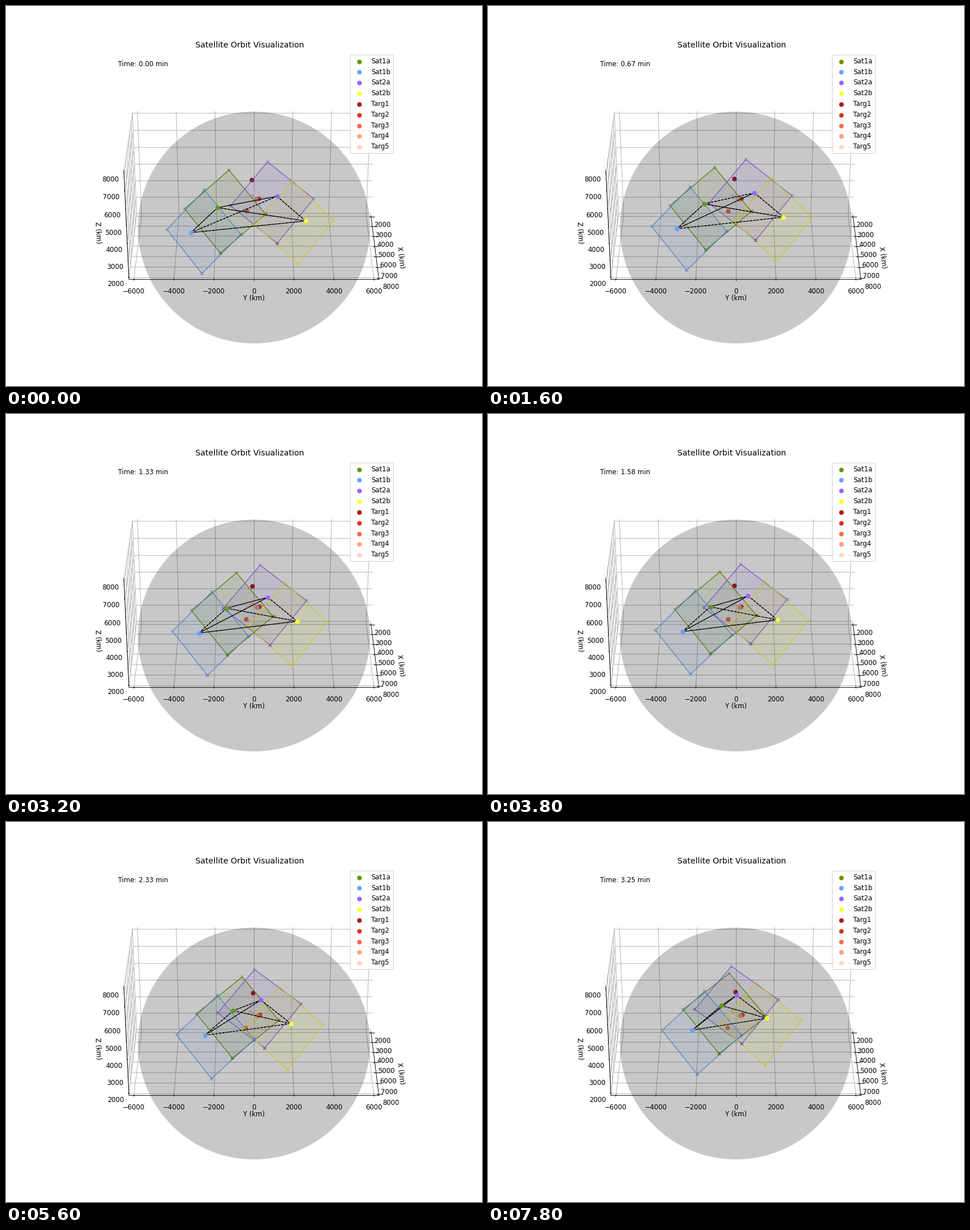
Write a matplotlib script that moves like this. It is 837 px wide and 669 px high and loops after 8000 ms.

```python
from itertools import combinations

import matplotlib.pyplot as plt
import numpy as np
from matplotlib.animation import FuncAnimation
from matplotlib.patches import Circle, Polygon

W, H, DPI = 837, 669, 83.7
FRAMES, STEP = 40, 200
CENTER, RADIUS = np.array([436, 390]), 204

# Each satellite: colour, start and end position, start and end footprint
# (corners ordered top, left, bottom, right), all in stage pixels.
SATS = {
    "Sat1a": ("#669900", (372, 355), (410.2, 323.2),
              [(392, 289), (314, 357), (377, 435), (456.5, 366.5)],
              [(424.5, 266.3), (343, 330), (406.3, 408), (489, 342.5)]),
    "Sat1b": ("#66a3ff", (325, 399), (359.3, 366.4),
              [(349, 324), (283, 393.5), (344.5, 471), (413, 402)],
              [(380.8, 297.7), (306, 367), (368, 444.3), (445.6, 375.3)]),
    "Sat2a": ("#9966ff", (476.5, 335), (437.3, 305),
              [(460, 274.3), (395, 351.5), (477, 418), (541, 339.5)],
              [(428, 254), (363.4, 329.9), (446.3, 390.3), (510.4, 313)]),
    "Sat2b": ("#ffff33", (527, 378.5), (490.2, 345.5),
              [(503.5, 307.5), (438, 384.5), (514, 454.5), (576, 377)],
              [(471.5, 282.8), (407.8, 358), (487, 428), (551, 350)]),
}
TARGETS = [
    ((432, 305.7), (435, 298.8)),
    ((444, 339), (447, 339)),
    ((423, 360), (420.5, 362.5)),
    ((440, 340.3), (443.2, 340.6)),
    ((432, 335.5), (429.3, 334.3)),
]


def mix(a, b, u):
    return np.array(a) * (1 - u) + np.array(b) * u


def corner_alpha(pts):
    """Fade corners that lie further round the globe."""
    r2 = ((pts - CENTER) ** 2).sum(axis=1)
    depth = -np.sqrt(np.maximum(RADIUS ** 2 - r2, 0))
    return 1 - 0.7 * (depth - depth.min()) / np.ptp(depth)


# The tiny excess keeps the pixel size from rounding down
fig = plt.figure(figsize=((W + 0.01) / DPI, (H + 0.01) / DPI), dpi=DPI)

ax = fig.add_subplot(projection="3d")
ax.set_xlim(1875, 8125)
ax.set_ylim(-6250, 6250)
ax.set_zlim(1875, 8125)
ax.set_box_aspect((1, 2, 1))
ax.view_init(30, 0)
ax.set_xlabel("X (km)")
ax.set_ylabel("Y (km)")
ax.set_zlabel("Z (km)")
ax.set_title("Satellite Orbit Visualization")
for axis in (ax.xaxis, ax.yaxis, ax.zaxis):
    axis.set_pane_color((1, 1, 1, 0))
clock = ax.text2D(0.05, 0.95, "", transform=ax.transAxes)

top = fig.add_axes([0, 0, 1, 1], zorder=5)
top.set(xlim=(0, W), ylim=(H, 0))
top.axis("off")


def dot(color, label, z):
    return top.scatter([], [], s=36, color=[color], label=label, zorder=z)


reds = plt.get_cmap("Reds")
targets = [dot(reds((5 - k) / 6), f"Targ{k + 1}", 1 + k / 10) for k in range(5)]

sats, prints = [], []
for name, (color, _, _, corners, _) in SATS.items():
    fill = top.add_patch(Polygon(corners, fc=color, ec="none", alpha=0.1, zorder=2))
    edge = top.add_patch(Polygon(corners, fc="none", ec=color, lw=1, zorder=2.1))
    marks = top.scatter(*np.transpose(corners), s=20, marker="x", color=color,
                        zorder=2.2)
    prints.append((fill, edge, marks))
    sats.append(dot(color, name, 5))

top.add_patch(Circle(CENTER, RADIUS, fc="black", ec="none", alpha=0.216, zorder=3))

# Every link is drawn once from each end, so the dashes interleave
links = [(a, b, [top.plot([], [], "k--", lw=1, zorder=4)[0] for _ in range(2)])
         for a, b in combinations(range(4), 2)]

ax.legend(handles=sats + targets, loc="upper right")


def draw(i):
    u = i / (FRAMES - 1)
    clock.set_text(f"Time: {i * 5 / 60:.2f} min")
    for mark, (start, end) in zip(targets, TARGETS):
        mark.set_offsets([mix(start, end, u)])

    places = []
    for sat, shapes, spec in zip(sats, prints, SATS.values()):
        _, start, end, first, last = spec
        pos, corners = mix(start, end, u), mix(first, last, u)
        places.append(pos)
        sat.set_offsets([pos])
        fill, edge, marks = shapes
        fill.set_xy(corners)
        edge.set_xy(corners)
        marks.set_offsets(corners)
        marks.set_alpha(corner_alpha(corners))

    for a, b, (there, back) in links:
        ends = np.transpose([places[a], places[b]])
        there.set_data(ends)
        back.set_data(ends[:, ::-1])
    return []


anim = FuncAnimation(fig, draw, frames=FRAMES, interval=STEP, repeat=True,
                     repeat_delay=0, init_func=lambda: draw(0), blit=False)
plt.show()
```
